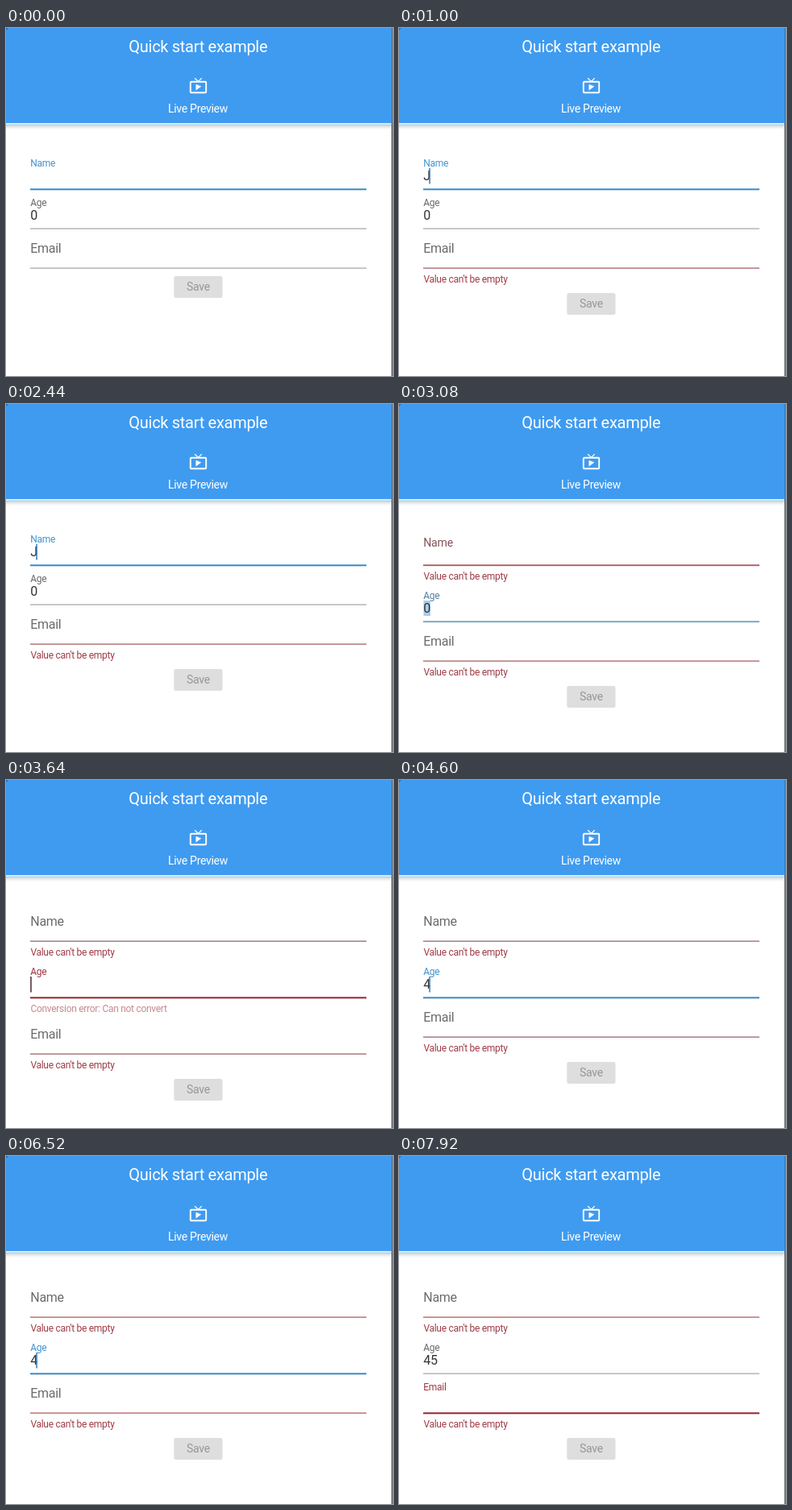
These frames come from a looping animation (480x432 px, 8000 ms). An HTML page:

```html
<!DOCTYPE html>
<html lang="en">
<head>
<meta charset="utf-8">
<title>Quick start example</title>
<style>
  html, body { margin: 0; width: 100%; height: 100%; overflow: hidden; background: #fff; }
  svg { display: block; width: 480px; height: 432px; font-family: Roboto, sans-serif; letter-spacing: -.018em; }
</style>
</head>
<body>
<svg id="stage" viewBox="0 0 480 432">
  <defs>
    <linearGradient id="shadow" x2="0" y2="1">
      <stop stop-color="#d6dbdf"/><stop offset="1" stop-color="#fff"/>
    </linearGradient>
  </defs>
  <rect y="121" width="480" height="5" fill="url(#shadow)"/>
  <rect width="480" height="118" fill="#3f9bf0"/>
  <rect y="118" width="480" height="2" fill="#d8ecfc"/>
  <rect y="120" width="480" height="1" fill="#a9cdea"/>
  <path d="M0 0h3l-3 3z" fill="#2c6cab"/>
  <g fill="#fff" text-anchor="middle">
    <text x="238.3" y="30" font-size="20">Quick start example</text>
    <text x="238" y="104.8" font-size="14">Live Preview</text>
  </g>
  <g fill="none" stroke="#fff" stroke-width="1.9">
    <rect x="228.8" y="66.8" width="19.4" height="13.5" rx="1"/>
    <path d="M234.1 62.3l4.3 4.2l4.3-4.2" stroke-width="1.2"/>
    <path d="M235.5 69.7v7.7l6.8-4.8z" fill="#fff" stroke="none"/>
  </g>
  <rect x="478" width="1" height="118" fill="#000" opacity=".2"/>
  <rect x="478" y="118" width="1" height="314" fill="#63676b"/>
  <rect x="479" width="1" height="432" fill="#80858a"/>
  <g id="save">
    <rect x="208.3" width="60.2" height="27" rx="2.5" fill="#dedede"/>
    <text x="238.4" y="18.3" font-size="14" fill="#979797" text-anchor="middle">Save</text>
  </g>
</svg>
<script>
const LOOP = 8000;
const GREY = [107, 107, 107], RULE = [190, 190, 190], BLUE = [66, 148, 208], BLUE_RULE = [58, 138, 198];
const RED = [160, 56, 66], RED_RULE = [152, 36, 48], PINK = [198, 130, 135], DULL = [170, 142, 143];
const EMPTY = "Value can't be empty";

// Keys, as [time, value]; the latest one reached applies.
const shifts = [-1000, 740, 1720, 2230, 2800, 3520, 4505].map(t => [t]);
const strokes = [-780, 740, 1720, 2230, 2800, 2995, 3520, 4505, 7020, 7280].map(t => [t]);
const specs = [
  { label: "Name", focus: [-1000, 2995],
    value: [[-1000, ""], [740, "J"], [1720, ""], [2230, "J"], [2800, ""]],
    error: [[-1000, ""], [1720, EMPTY], [2230, ""], [2800, EMPTY]] },
  { label: "Age", focus: [2995, 7280],
    value: [[-1000, "0"], [3520, ""], [4505, "4"], [7020, "45"]],
    error: [[-1000, ""], [3520, "Conversion error: Can not convert"], [4505, ""]] },
  { label: "Email", focus: [7280, 1e9],
    value: [[-1000, ""]],
    error: [[-1000, ""], [740, EMPTY]] },
];

const stage = document.getElementById("stage"), save = document.getElementById("save");
const clamp = x => Math.max(0, Math.min(1, x));
const lerp = (a, b, p) => a + (b - a) * p;
const blend = (a, b, p) => a.map((v, i) => lerp(v, b[i], p));
const mix = (a, b, p) => `rgb(${blend(a, b, p)})`;
const latest = (keys, t) => keys.filter(k => k[0] <= t).pop();
const ease = x => {
  x = 1 - (1 - clamp(x)) ** 1.5;
  return x * x * (3 - 2 * x);
};

function set(el, attrs) {
  for (const k in attrs) el.setAttribute(k, attrs[k]);
}

function add(parent, tag, attrs = {}) {
  const el = parent.appendChild(document.createElementNS("http://www.w3.org/2000/svg", tag));
  set(el, attrs);
  return el;
}

// Parts of a field are placed relative to its underline.
const fields = specs.map(spec => {
  const row = add(stage, "g");
  const field = {
    ...spec, row,
    rule: add(row, "rect", { x: 30, y: -.7, width: 417 }),
    mark: add(row, "rect", { x: 30.5, y: -26, width: 8.5, height: 19, fill: "#a9cdea" }),
    title: add(row, "text", { x: 30.3 }),
    text: add(row, "text", { x: 30.3, y: -11, "font-size": 16, fill: "#333" }),
    caret: add(row, "rect", { y: -26, width: 1.5, height: 19.5 }),
    note: add(row, "text", { x: 30.4, y: 18.3, "font-size": 12, fill: "#9f3c46" }),
  };
  field.title.textContent = spec.label;
  return field;
});

function draw(t) {
  const sinceStroke = t - latest(strokes, t)[0];
  const settled = clamp((t - latest(shifts, t)[0]) / 400);
  let y = 200;
  for (const f of fields) {
    const [start, end] = f.focus;
    const focused = t >= start && t < end;
    const p = ease((t - start) / 218) - ease((t - end) / 218);
    const value = latest(f.value, t)[1];
    const [since, error] = latest(f.error, t);
    const float = value ? 1 : p;
    const selected = focused && value === "0";

    set(f.row, { transform: `translate(0 ${y})` });
    const idle = error ? blend(DULL, PINK, settled) : RULE;
    set(f.rule, { height: lerp(1.7, 2, p), fill: mix(idle, error ? RED_RULE : BLUE_RULE, p) });
    set(f.title, {
      y: lerp(-19, -28, float),
      "font-size": lerp(16, 12, float),
      fill: mix(GREY, error ? RED : BLUE, p),
    });
    f.text.textContent = value;
    set(f.mark, { opacity: selected ? 1 : 0 });
    set(f.caret, {
      x: Math.max(30.2, 28.7 + 8.6 * value.length),
      fill: error ? "#4a2a2e" : "#2f78b4",
      opacity: focused && !selected && sinceStroke % 1000 < 500 ? 1 : 0,
    });
    f.note.textContent = error;
    set(f.note, { opacity: clamp((t - since) / 200) });
    y += error ? 70 : 49;
  }
  set(save, { transform: `translate(0 ${y - 39})` });
}

function tick() {
  draw(performance.now() % LOOP);
  requestAnimationFrame(tick);
}
tick();
</script>
</body>
</html>
```
